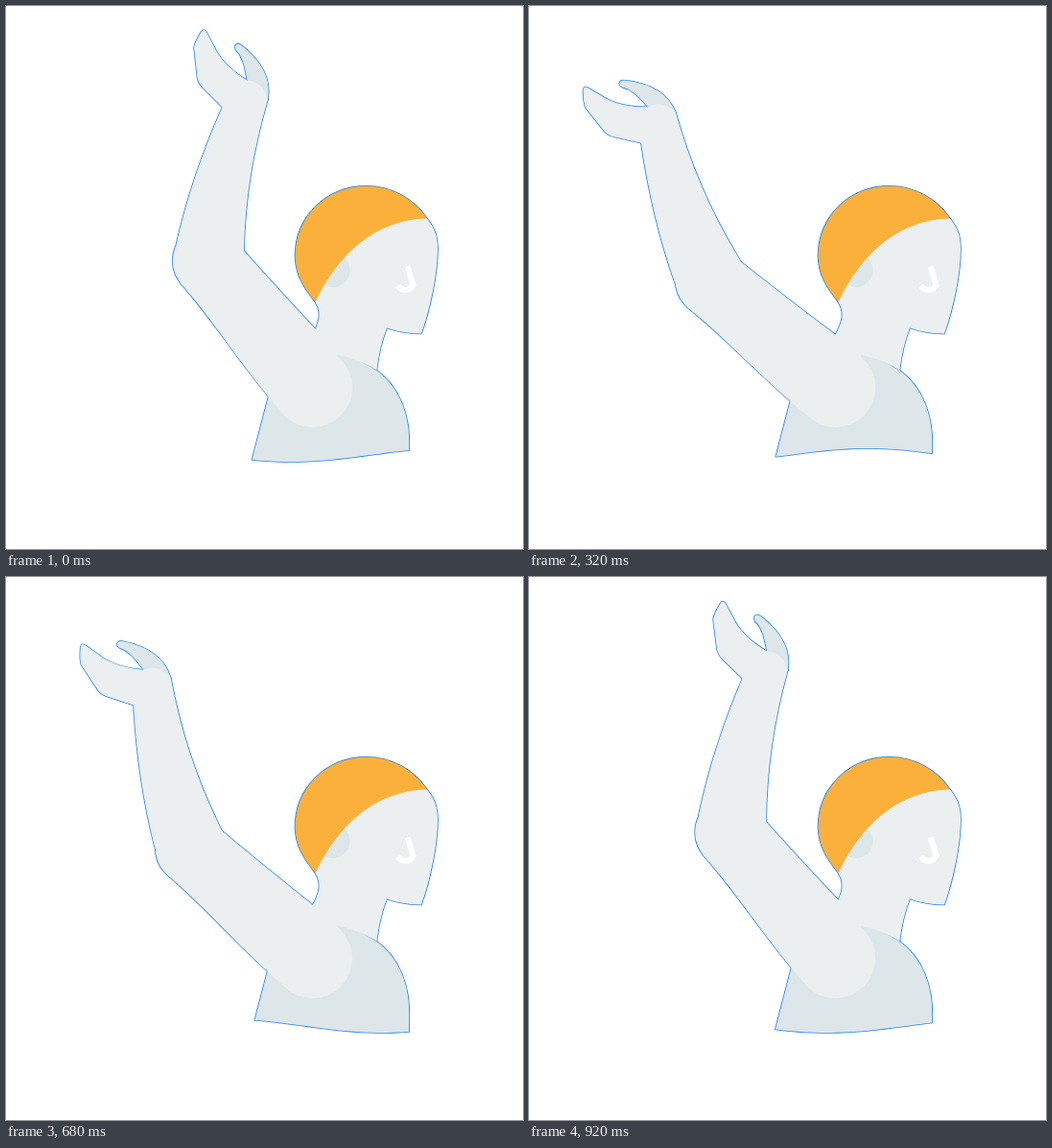
Recreate the animation shown at these times as an HTML page with a canvas. Size 539 by 566 pixels, loop 960 ms.

```html
<!DOCTYPE html>
<html lang="en">
<head>
<meta charset="utf-8">
<title>Waving swimmer</title>
<style>
  html, body { margin: 0; width: 100%; height: 100%; overflow: hidden; background: #fff; }
  canvas { display: block; width: 539px; height: 566px; }
</style>
</head>
<body>
<canvas id="stage" width="539" height="566"></canvas>
<script>
const ctx = document.getElementById('stage').getContext('2d');

const LOOP = 960, STEP = 40;
const SKIN = '#ebeff0', SHADE = '#dde6e9', CAP = '#fbb03b', EDGE = '#2482f7';
const SHOULDER = { x: 319, y: 397 }, ELBOW = { x: 210, y: 265 };
const UPPER_SWING = 13.4, FOREARM_SWING = 43.4;

const disc = (x, y, r) => {
  const path = new Path2D();
  path.arc(x, y, r, 0, Math.PI * 2);
  return path;
};

const head = new Path2D(`M438.500 221 C447 232 449.500 240 449.500 252 C449.500 280 441 318 432.500 341
  C420 341 408 339 396.500 335 Q388.500 356 386 379 Q368 368 346 363 L319 397 L305 370
  L317 345 Q322 338 325 328 Q328 318 322 308 L350 240 L400 205 Z`);
const cap = new Path2D(`M322 308 C311 294 301 280 301 260 C301 219 334 187.300 375 187.300
  C401 187.300 424 200 438.500 221 C384 222 345 259 322 308 Z`);
const ear = disc(340.5, 275, 17.5);
const nose = new Path2D('M418 271 L424 290 C421 297 412 297 408 291');

// The arm is described in its raised pose and swung from there.
const upperArm = new Path2D(`M181 288 C215 326 240 368 285 421 L319 397 L336 351
  Q285 297 239 245 L210 265 Z`);
const shoulderCap = disc(SHOULDER.x, SHOULDER.y, 41.7);
const elbowCap = disc(ELBOW.x, ELBOW.y, 36.8);
const forearm = new Path2D(`M225 105 Q193 177 177 248 L190 275 L247 268 L247.500 255
  Q249 176 272.500 97 C270 86 262 77 251 77 C236 68 222 55 216 41 L209 27.500
  Q206 22 203 26.500 Q196 38 195.500 43 L199 74 Q200 80 205 85 Z`);
const thumb = new Path2D(`M251 77 C248 60 246 52 239 45 Q237 41 240 39.500 Q242 38 245 40.500
  C262 54 277 72 272.500 97 L262 100 L251 85 Z`);

function torso(phase) {
  const right = 419.7;
  const path = new Path2D(`M305 375 L330 355 Q364 365 386 379.500 C409 396 421.500 425 ${right} 461`);
  for (let u = 1; u > -0.01; u -= 0.05) {
    const y = 467.5 + 7 * Math.cos(Math.PI * u + phase - Math.PI / 4);
    const left = 273 - (y - 407) * 0.26;
    path.lineTo(left + (right - left) * u, y);
  }
  path.lineTo(273, 407);
  path.closePath();
  return path;
}

const turn = (matrix, pivot, degrees) =>
  matrix.translate(pivot.x, pivot.y).rotate(degrees).translate(-pivot.x, -pivot.y);

const smooth = u => u * u * (3 - 2 * u);

function placed(path, matrix) {
  const result = new Path2D();
  result.addPath(path, matrix);
  return result;
}

function draw(time) {
  const progress = time / LOOP;
  const swing = smooth(1 - Math.abs(1 - 2 * progress));
  const upper = turn(new DOMMatrix(), SHOULDER, -UPPER_SWING * swing);
  const lower = turn(upper, ELBOW, (UPPER_SWING - FOREARM_SWING) * swing);

  const parts = [
    [torso(progress * Math.PI * 2), SHADE],
    [shoulderCap, SKIN],
    [placed(upperArm, upper), SKIN],
    [placed(elbowCap, upper), SKIN],
    [placed(thumb, lower), SHADE],
    [placed(forearm, lower), SKIN],
    [head, SKIN],
    [ear, SHADE],
    [cap, CAP]
  ];

  ctx.setTransform(1, 0, 0, 1, 0, 0);
  ctx.fillStyle = '#fff';
  ctx.fillRect(0, 0, 539, 566);
  ctx.translate(0.5, 0.5);

  // Fills hide the inner half of every stroke, leaving a hairline around the figure.
  ctx.strokeStyle = EDGE;
  ctx.lineWidth = 1.6;
  ctx.lineJoin = 'round';
  for (const [path] of parts) ctx.stroke(path);
  for (const [path, color] of parts) {
    ctx.fillStyle = color;
    ctx.fill(path);
  }

  ctx.strokeStyle = '#fff';
  ctx.lineWidth = 6;
  ctx.lineJoin = 'miter';
  ctx.stroke(nose);
}

const start = performance.now();
function tick() {
  const elapsed = (performance.now() - start) % LOOP;
  draw(Math.floor(elapsed / STEP) * STEP);
  requestAnimationFrame(tick);
}
tick();
</script>
</body>
</html>
```
